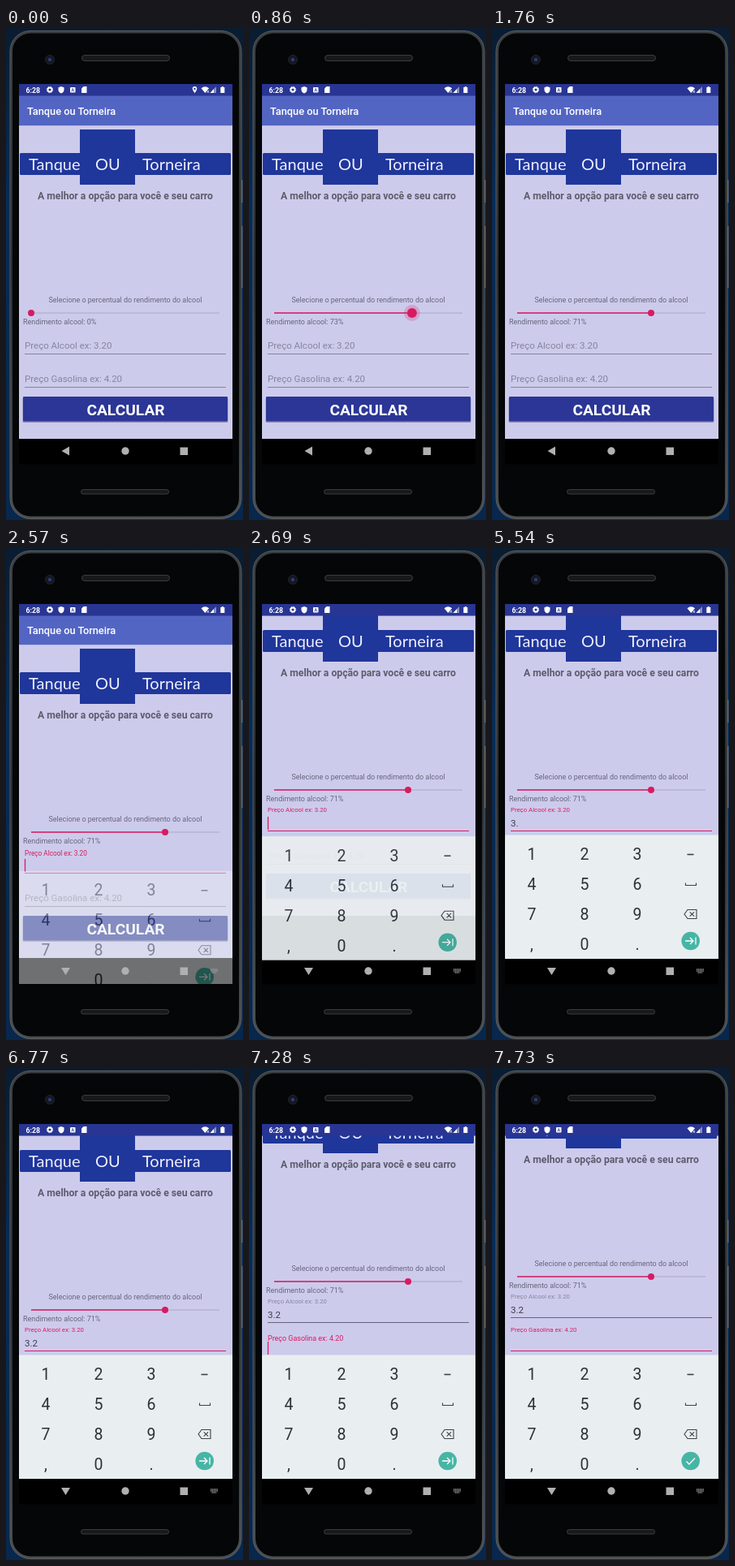
Recreate the animation shown at these times as an HTML page. Size 292 px wide and 606 px high, loop 8 s.

```html
<!DOCTYPE html>
<html lang="pt">
<head>
<meta charset="utf-8">
<title>Tanque ou Torneira</title>
<style>
  html, body { margin: 0; width: 100%; height: 100%; overflow: hidden; background: #07254a; }
  svg { display: block; width: 100vw; height: 100vh; font-family: Roboto, sans-serif; }
  .bold { font-weight: 700; }
  .small { font-size: 8.96px; fill: #66657a; }
  .line { fill: none; stroke: #3c4247; stroke-width: 1.1; }
</style>
</head>
<body>
<svg viewBox="0 0 292 606">
  <defs>
    <linearGradient id="backdrop" x2="0" y2="1">
      <stop stop-color="#0a1c30"/><stop offset=".35" stop-color="#062c58"/><stop offset="1" stop-color="#08274c"/>
    </linearGradient>
    <linearGradient id="rim" x2="0" y2="1">
      <stop stop-color="#3c3f41"/><stop offset=".5" stop-color="#2a2c2e"/><stop offset="1" stop-color="#4c4f51"/>
    </linearGradient>
    <clipPath id="screenClip"><rect x="16" y="69" width="263" height="468"/></clipPath>
    <clipPath id="appClip"><rect x="16" y="69" width="263" height="437"/></clipPath>
  </defs>

  <!-- phone -->
  <rect width="292" height="606" fill="url(#backdrop)"/>
  <path d="M290.500 187V215M290.500 244V320" stroke="#66696b" stroke-width="2"/>
  <rect x="5" y="3.500" width="285" height="601" rx="25" fill="url(#rim)" stroke="#5b5e60"/>
  <rect x="8" y="6.500" width="279" height="595" rx="22" fill="#050607"/>
  <circle cx="54" cy="39" r="5.500" fill="#15161f" stroke="#24252d"/>
  <circle cx="54" cy="39" r="2.200" fill="#2b3c78"/>
  <rect x="93.500" y="33.500" width="108" height="7" rx="3.500" fill="#17191a" stroke="#3a3d3f"/>
  <rect x="92.500" y="568.500" width="108" height="5.500" rx="2.700" fill="#17191a" stroke="#3a3d3f"/>

  <!-- app -->
  <g clip-path="url(#appClip)">
    <rect x="16" y="69" width="263" height="437" fill="#000"/>
    <g id="page">
      <rect x="16" y="69" width="263" height="437" fill="#cdcbec"/>
      <rect x="16" y="69" width="263" height="51" fill="#5365c3"/>
      <rect x="16" y="120" width="263" height="1" fill="#bbb9e0"/>
      <text x="26" y="106.500" font-size="12.8" font-weight="500" fill="#fff">Tanque ou Torneira</text>

      <g fill="#1f369b">
        <rect x="91" y="125" width="68" height="68"/>
        <rect x="17" y="154" width="260" height="27" rx="1.500"/>
      </g>
      <g font-family="Lato, sans-serif" font-size="20" fill="#eef">
        <text x="28" y="175">Tanque</text>
        <text x="110" y="175">OU</text>
        <text x="168" y="175">Torneira</text>
      </g>

      <text class="bold" x="147" y="211" text-anchor="middle" font-size="12.200" fill="#5d5c6c">A melhor a opção para você e seu carro</text>
      <text class="small" x="147" y="338" text-anchor="middle">Selecione o percentual do rendimento do alcool</text>
      <path d="M31 351H263" stroke="#aaa8c4"/>
      <path id="progress" stroke="#d81b60" stroke-width="1.300"/>
      <circle id="halo" cy="351" r="10" fill="#d81b60"/>
      <circle id="thumb" cy="351" fill="#d81b60"/>
      <text id="percent" class="small" x="21" y="364.600"></text>

      <g id="fields"></g>

      <rect x="20.500" y="455" width="253" height="31" rx="1.500" fill="#8f8eb5"/>
      <rect x="21" y="454" width="252" height="30.500" rx="1" fill="#2b3696"/>
      <text class="bold" x="147.500" y="477" text-anchor="middle" font-size="19.200" fill="#fff">CALCULAR</text>
    </g>
  </g>

  <!-- status bar -->
  <rect x="16" y="69" width="263" height="14.500" fill="#283593"/>
  <g fill="#fff">
    <text class="bold" x="24.500" y="79.500" font-size="8.800">6:28</text>
    <circle cx="54" cy="76" r="2.500" fill="none" stroke="#fff" stroke-width="1.800"/>
    <circle cx="54" cy="76" r="3.700" fill="none" stroke="#fff" stroke-dasharray="1.450"/>
    <path d="M68 72l3.500 1.300v2.700q0 3-3.500 4.500q-3.500-1.500-3.500-4.500v-2.700z"/>
    <rect x="79" y="73" width="6.500" height="6.500" rx=".8"/>
    <path d="M80.800 78.300l1.450-4 1.450 4m-2.300-1.300h1.700" fill="none" stroke="#283593" stroke-width=".7"/>
    <path d="M95.500 72h4v8h-6.500v-5.500z"/>
    <path id="location" d="M232.500 72a2.800 2.800 0 0 1 2.800 2.800q0 2-2.800 5.400q-2.800-3.400-2.800-5.400a2.800 2.800 0 0 1 2.800-2.800zm0 1.700a1.200 1.200 0 1 0 .01 0z" fill-rule="evenodd"/>
    <path d="M240.500 74.200q4.800-3.700 9.600 0l-4.800 5.800z"/>
    <path d="M247.500 77l2.500 2.800m0-2.800l-2.500 2.800" stroke="#fff" stroke-width=".8"/>
    <path d="M259 72v8h-7.500z" opacity=".45"/><path d="M256 75.200v4.800h-4.500z"/>
    <path d="M265.800 72h2v1h1.500v7h-5v-7h1.500z"/>
  </g>

  <!-- navigation bar and keyboard -->
  <rect x="16" y="506" width="263" height="31.500" fill="#000"/>
  <g clip-path="url(#screenClip)">
    <g id="keyboard">
      <rect x="16" y="353.500" width="263" height="152.500" fill="#e9eef1"/>
      <g id="keys" font-size="19.500" text-anchor="middle"></g>
      <path class="line" d="M240.500 377.500H248.500" style="stroke-width:1.600"/>
      <path class="line" d="M238.500 412.500V415.500H251.500V412.500"/>
      <path class="line" d="M237 451l4-5.500h11v11h-11zM243.700 448.300l5.400 5.400m0-5.400l-5.400 5.400"/>
      <circle id="enter" cx="244.700" cy="484" r="11.300"/>
      <path id="enterIcon" fill="none" stroke="#fff" stroke-width="1.300"/>
    </g>
  </g>
  <g fill="#b0b0b0">
    <path id="back"/>
    <circle cx="147" cy="521" r="4.700"/>
    <rect x="214.500" y="516.500" width="9.500" height="9.500"/>
    <path id="keyboardIcon" d="M252 519h9m-9 2h9m-7.500 2h6" stroke="#999" stroke-width="1.300" stroke-dasharray="1.300 .6"/>
  </g>
</svg>

<script>
const LOOP = 8000, PINK = '#d81b60', GREY = '#86859b';
const $ = id => document.getElementById(id);
const set = (el, attrs) => { for (const name in attrs) el.setAttribute(name, attrs[name]); };
const clamp = p => Math.min(1, Math.max(0, p));
const easeOut = (t, start, length, power = 2) => 1 - (1 - clamp((t - start) / length)) ** power;
const mix = (a, b, p) => a + (b - a) * p;

// Keypad
const keyRows = ['123', '456', '789', ',0.'];
$('keys').innerHTML = keyRows.flatMap((row, r) => [...row].map((key, c) =>
  `<text id="key${key}" x="${49 + 65 * c}" y="${384 + 37 * r}">${key}</text>`)).join('');

const presses = [
  { key: '3', down: 3680, up: 3740 },
  { key: '.', down: 4730, up: 5040 },
  { key: '2', down: 6050, up: 6260 }
];
const focusTimes = [2370, 7220];
const caretResets = [2380, ...presses.map(p => p.up), 7230];

// Text fields with floating labels
function makeField(label, dy, floatStart) {
  const group = document.createElementNS('http://www.w3.org/2000/svg', 'g');
  set(group, { transform: `translate(0 ${dy})` });
  group.innerHTML = `<text x="23">${label}</text>
    <text x="23" y="395.5" font-size="11.5" fill="#3d3c49"></text>
    <path d="M23 401.5H271"/><path stroke="${PINK}" stroke-width="1.3"/>`;
  $('fields').append(group);
  const [hint, value, underline, caret] = group.children;

  return (t, focused, text, caretOn) => {
    const p = easeOut(t, floatStart, 167);
    set(hint, { y: mix(395, 377.8, p), 'font-size': mix(11.5, 7.8, p), fill: focused ? PINK : GREY });
    value.textContent = text;
    set(underline, {
      stroke: focused ? PINK : text ? '#656477' : GREY,
      'stroke-width': focused ? 1.2 : 1
    });
    const x = 23.5 + (text ? value.getComputedTextLength() : 0);
    set(caret, { d: `M${x} 384V400`, opacity: focused && caretOn ? 1 : 0 });
  };
}
const drawAlcohol = makeField('Preço Alcool ex: 3.20', 0, 2461);
const drawPetrol = makeField('Preço Gasolina ex: 4.20', 41, 7207);

function drawSlider(t) {
  const out = mix(31, 226, easeOut(t, 500, 500, 1.6));
  const x = t < 1000 ? out : mix(226, 196, easeOut(t, 1000, 260));
  const pressed = t >= 500 && t < 1640;
  const radius = pressed ? 6 : t < 500 ? 4 : mix(6, 4, clamp((t - 1640) / 120));
  set($('thumb'), { cx: x, r: radius });
  set($('halo'), { cx: x, opacity: t < 1370 ? 0.22 * clamp((t - 560) / 120) : 0 });
  set($('progress'), { d: `M31 351H${x}` });
  $('percent').textContent = `Rendimento alcool: ${Math.floor((x - 31) / 232 * 100)}%`;
}

function drawKeyboard(t) {
  const rise = easeOut(t, 2510, 210);
  set($('keyboard'), { transform: `translate(0 ${88 * (1 - rise)})`, opacity: easeOut(t, 2500, 260) });
  for (const key of keyRows.join('')) {
    const held = presses.some(p => p.key === key && t >= p.down && t < p.up);
    set($('key' + key), { fill: held ? '#7d868b' : '#2c3236' });
  }
  set($('enter'), { fill: t >= 7130 && t < 7220 ? '#35988a' : '#47b5a5' });
  set($('enterIcon'), { d: t < 7340
    ? 'M238 484h10m-4-4l4 4-4 4M251 479.500v9'
    : 'M239.500 484.500l3.500 3.500 7-7.500' });
  const shown = t >= 2500;
  set($('back'), { d: shown ? 'M68 517h11l-5.500 9z' : 'M78 515.500v11l-9.500-5.500z' });
  set($('keyboardIcon'), { opacity: shown ? 1 : 0 });
}

function render(t) {
  const pan = 53 * easeOut(t, 2570, 160, 4) + 41 * easeOut(t, 7220, 160, 4);
  set($('page'), { transform: `translate(0 ${-Math.round(pan)})` });
  set($('location'), { opacity: t < 650 ? 1 : 0 });
  drawSlider(t);

  const typed = presses.filter(p => t >= p.up).map(p => p.key).join('');
  const reset = caretResets.filter(time => t >= time).pop() ?? 0;
  const caretOn = Math.floor((t - reset) / 500) % 2 === 0;
  const focus = focusTimes.filter(time => t >= time).length;
  drawAlcohol(t, focus === 1, typed, caretOn);
  drawPetrol(t, focus === 2, '', caretOn);
  drawKeyboard(t);
}

function tick() {
  render(performance.now() % LOOP);
  requestAnimationFrame(tick);
}
tick();
</script>
</body>
</html>
```
